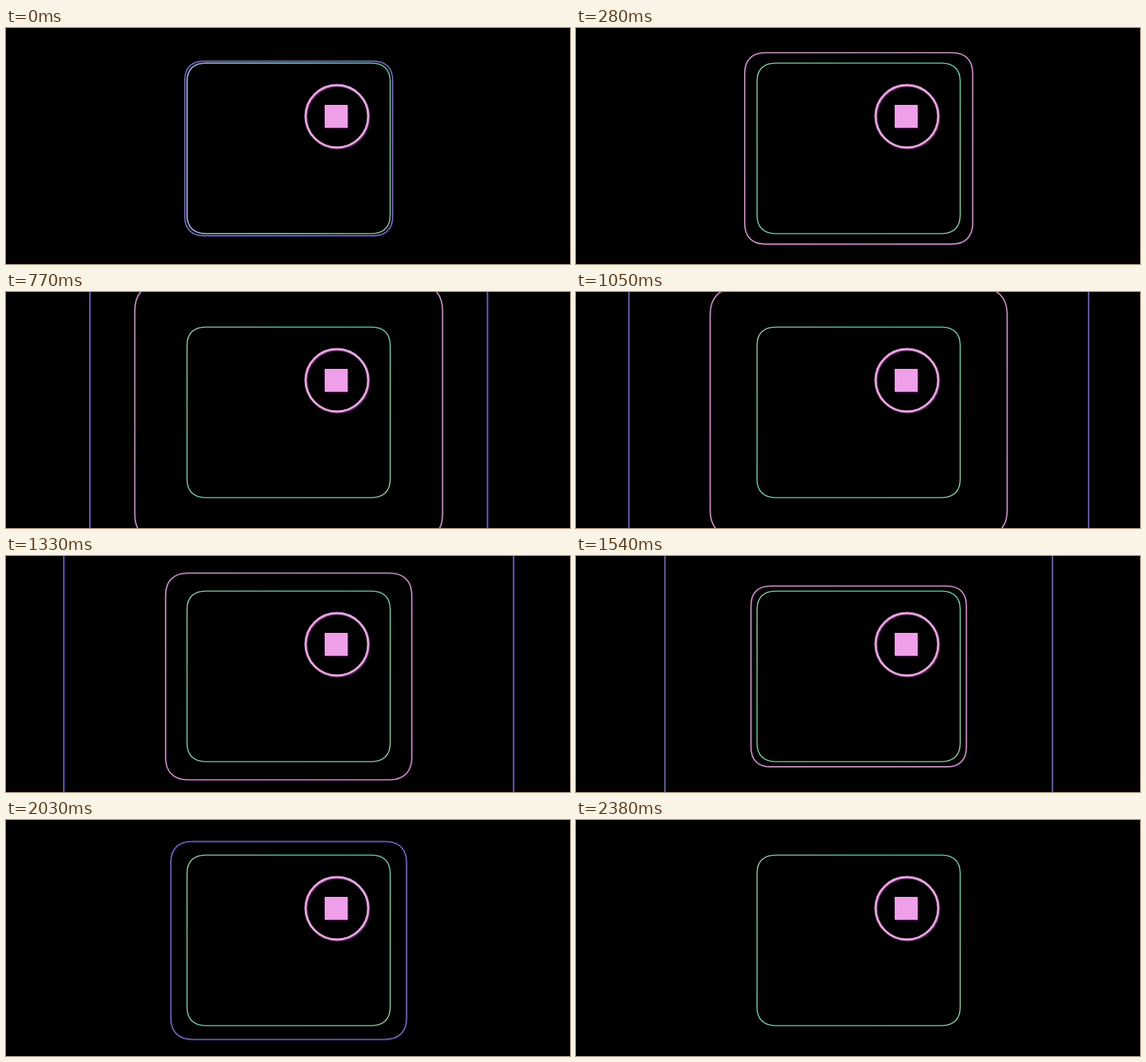
Recreate the animation shown at these times as an HTML page with a canvas. Size 738 by 310 pixels, loop 2450 ms.

```html
<!DOCTYPE html>
<html lang="en">
<head>
<meta charset="utf-8">
<title>Pulsing frames</title>
<style>
  html, body { margin: 0; width: 100%; height: 100%; overflow: hidden; background: #000; }
  canvas { display: block; width: 738px; height: 310px; }
</style>
</head>
<body>
<canvas id="stage" width="738" height="310"></canvas>
<script>
const ctx = document.getElementById('stage').getContext('2d');
const LOOP = 2450, STEP = 70;
const CENTER = { x: 369.8, y: 158.1 };
const HALF = { w: 132.9, h: 112 };
const CORNER = 24, ROUNDNESS = 0.64;

// [time in ms, growth beyond the resting size]
const PINK_PATH = [[0, 0], [245, 0.095], [490, 0.333], [770, 0.515], [850, 0.526],
  [1050, 0.462], [1330, 0.212], [1540, 0.06], [1700, 0]];
const VIOLET_PATH = [[0, 0.023], [245, 0.07], [490, 0.325], [560, 0.477], [770, 0.957],
  [1050, 1.263], [1140, 1.272], [1330, 1.214], [1750, 0.568], [2100, 0.08], [2300, 0]];

// Cubic interpolation through the keys, at rest at both ends.
function follow(path, t) {
  const last = path.length - 1;
  if (t >= path[last][0]) return 0;
  const i = path.findIndex((key, k) => k < last && t < path[k + 1][0]);
  const slope = k => k === 0 || k === last ? 0
    : (path[k + 1][1] - path[k - 1][1]) / (path[k + 1][0] - path[k - 1][0]);
  const [t0, a] = path[i], [t1, b] = path[i + 1];
  const d = t1 - t0, u = (t - t0) / d, v = 1 - u;
  return v * v * (1 + 2 * u) * a + u * u * (3 - 2 * u) * b
    + d * u * v * (v * slope(i) - u * slope(i + 1));
}

// Evenly spaced colours, clockwise from the right-hand side.
function conic(...colors) {
  const g = ctx.createConicGradient(0, CENTER.x, CENTER.y);
  [...colors, colors[0]].forEach((c, i) => g.addColorStop(i / colors.length, c));
  return g;
}

function linear(x0, y0, x1, y1, ...colors) {
  const g = ctx.createLinearGradient(x0, y0, x1, y1);
  colors.forEach((c, i) => g.addColorStop(i / (colors.length - 1), c));
  return g;
}

const TEAL = conic('#8ed0a6', '#94d2a8', '#70d4b0', '#72d6b0',
  '#8acca4', '#90d4ac', '#6cdab4', '#6cd8b0');
const PINK = conic('#d8a0d0', '#d8a4d2', '#d49ece', '#dca0d6',
  '#d2a4cc', '#d8a8d2', '#d0a8ca', '#d8a4d2');
const VIOLET = '#8274c0';
const FROST = linear(237, 0, 503, 0, '#b0a4ee', '#84c8ee', 'rgba(132,200,238,0)');
const RING = linear(400, 85, 466, 147, '#e6a4e0', '#e2a6da', '#e2a8dc');

function tracePanel(scale, shift = 0) {
  const w = HALF.w * scale, h = HALF.h * scale;
  const e = CORNER * scale, c = e * (1 - ROUNDNESS);
  const l = CENTER.x - w + shift, r = CENTER.x + w + shift;
  const t = CENTER.y - h + shift, b = CENTER.y + h + shift;
  ctx.beginPath();
  ctx.moveTo(l + e, t);
  ctx.lineTo(r - e, t);
  ctx.bezierCurveTo(r - c, t, r, t + c, r, t + e);
  ctx.lineTo(r, b - e);
  ctx.bezierCurveTo(r, b - c, r - c, b, r - e, b);
  ctx.lineTo(l + e, b);
  ctx.bezierCurveTo(l + c, b, l, b - c, l, b - e);
  ctx.lineTo(l, t + e);
  ctx.bezierCurveTo(l, t + c, l + c, t, l + e, t);
  ctx.closePath();
}

// Panels are opaque, so a larger one in front hides those behind it.
function drawPanel(scale, color, glow) {
  tracePanel(scale);
  ctx.fillStyle = '#000';
  ctx.fill();
  if (glow) {
    tracePanel(scale, 1);
    ctx.strokeStyle = glow;
    ctx.lineWidth = 1.8;
    ctx.stroke();
  }
  tracePanel(scale);
  ctx.strokeStyle = color;
  ctx.lineWidth = 1.4;
  ctx.stroke();
}

function drawBadge(shift, ring, fill) {
  ctx.beginPath();
  ctx.arc(433 + shift, 116 + shift, 41, 0, Math.PI * 2);
  ctx.strokeStyle = ring;
  ctx.lineWidth = 3;
  ctx.stroke();
  ctx.fillStyle = fill;
  ctx.fillRect(417 + shift, 101 + shift, 30, 30);
}

function draw(t) {
  ctx.fillStyle = '#000';
  ctx.fillRect(0, 0, 738, 310);

  const violet = follow(VIOLET_PATH, t), pink = follow(PINK_PATH, t);
  if (violet > 0.003) drawPanel(1 + violet, VIOLET, '#1a1248');
  if (pink > 0.003) drawPanel(1 + pink, PINK, '#341034');
  drawPanel(1, TEAL);

  const frost = 1 - t / 140;
  if (frost > 0) {
    ctx.globalAlpha = frost * 0.75;
    tracePanel(1);
    ctx.strokeStyle = FROST;
    ctx.stroke();
    ctx.globalAlpha = 1;
  }

  drawBadge(1.4, '#4a124a', '#4a124a');
  drawBadge(0, RING, '#f0a0ea');
}

function tick() {
  const t = performance.now() % LOOP;
  draw(Math.floor(t / STEP) * STEP);
  requestAnimationFrame(tick);
}
tick();
</script>
</body>
</html>
```
